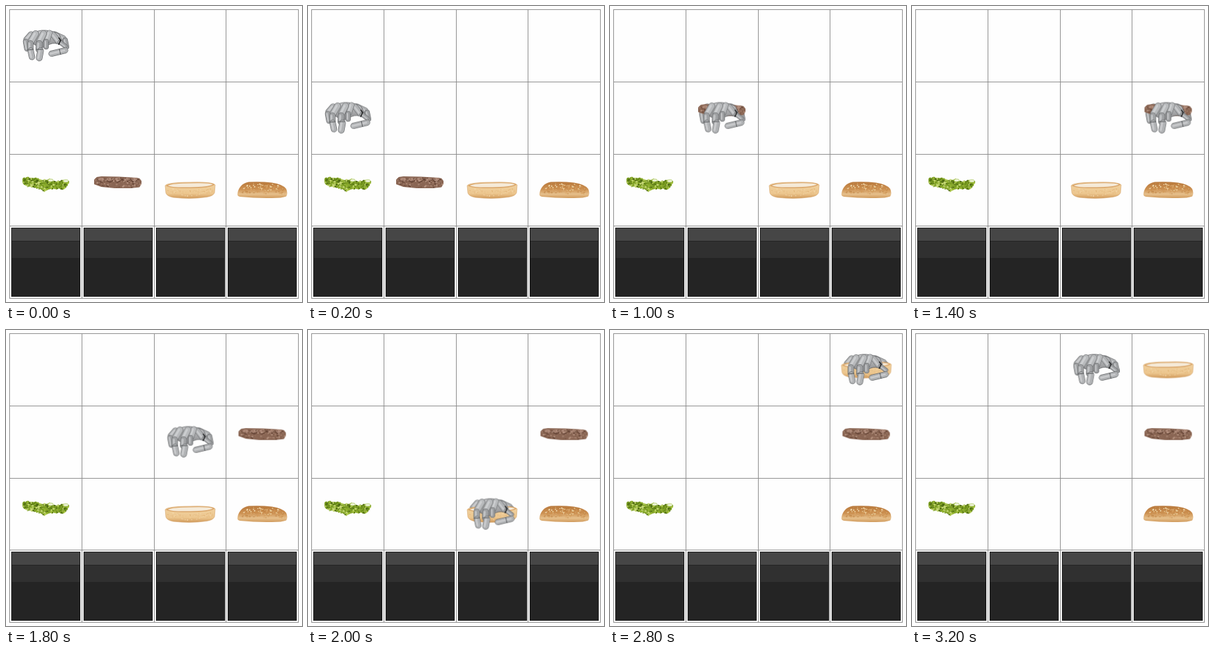
Recreate the animation shown at these times as an HTML page. Size 450x450 px, loop 3.4 s.

```html
<!DOCTYPE html>
<html lang="en">
<head>
<meta charset="utf-8">
<title>Robot hand stacking a burger</title>
<style>
  html, body { margin: 0; width: 100%; height: 100%; overflow: hidden; background: #fefefe; }
  svg { display: block; width: 100vw; height: 100vh; --c: 109.75px; }
  .hand, #patty, #base { animation: 3400ms step-end infinite; }
  .hand { animation-name: hand; }
  #patty { animation-name: patty; }
  #base { animation-name: base; }

  /* Everything jumps in whole cells. */
  @keyframes hand {
    0% { transform: translate(0, 0); }
    5.882% { transform: translate(0, var(--c)); }
    11.764% { transform: translate(0, calc(2 * var(--c))); }
    17.647% { transform: translate(var(--c), calc(2 * var(--c))); }
    29.411% { transform: translate(var(--c), var(--c)); }
    35.294% { transform: translate(calc(2 * var(--c)), var(--c)); }
    41.176% { transform: translate(calc(3 * var(--c)), var(--c)); }
    52.941% { transform: translate(calc(2 * var(--c)), var(--c)); }
    58.823% { transform: translate(calc(2 * var(--c)), calc(2 * var(--c))); }
    70.588% { transform: translate(calc(2 * var(--c)), var(--c)); }
    76.470% { transform: translate(calc(2 * var(--c)), 0); }
    82.352% { transform: translate(calc(3 * var(--c)), 0); }
    94.117%, 100% { transform: translate(calc(2 * var(--c)), 0); }
  }
  @keyframes patty {
    0% { transform: translate(0, 0); }
    29.411% { transform: translate(0, calc(-1 * var(--c))); }
    35.294% { transform: translate(var(--c), calc(-1 * var(--c))); }
    41.176%, 100% { transform: translate(calc(2 * var(--c)), calc(-1 * var(--c))); }
  }
  @keyframes base {
    0% { transform: translate(0, 0); }
    70.588% { transform: translate(0, calc(-1 * var(--c))); }
    76.470% { transform: translate(0, calc(-2 * var(--c))); }
    82.352%, 100% { transform: translate(var(--c), calc(-2 * var(--c))); }
  }
</style>
</head>
<body>
<svg viewBox="0 0 450 450">
  <defs>
    <linearGradient id="crust" x1="0" y1="0" x2="0" y2="1">
      <stop offset="0" stop-color="#b97a3e"/>
      <stop offset=".45" stop-color="#cb8f50"/>
      <stop offset=".75" stop-color="#e6c08c"/>
      <stop offset="1" stop-color="#d09a5c"/>
    </linearGradient>
    <linearGradient id="side" x1="0" y1="0" x2="0" y2="1">
      <stop offset="0" stop-color="#f0d2a2"/>
      <stop offset=".7" stop-color="#edc78f"/>
      <stop offset="1" stop-color="#d09a5b"/>
    </linearGradient>
    <linearGradient id="steel" x1="0" y1="0" x2="0" y2="1">
      <stop offset="0" stop-color="#cbccce"/>
      <stop offset="1" stop-color="#88898b"/>
    </linearGradient>
  </defs>

  <rect width="450" height="450" fill="#fefefe"/>
  <g id="grid" fill="#8c8c8c"></g>
  <g id="tiles"></g>

  <g id="handBack" class="hand"></g>

  <g id="lettuce"></g>
  <g id="patty"></g>
  <g id="base">
    <path d="M242 273 Q246 268 280 268 Q314 267 318 272 L317 284 Q315 289 305 290.500 Q280 294 254 291 Q244 289 243 284 Z" fill="url(#side)" stroke="#d3a268" stroke-width=".6"/>
    <path d="M243 273 Q250 268.500 280 268.500 Q312 267.500 317 271.500 Q312 276.500 280 277 Q248 277.500 243 273 Z" fill="#d9a467"/>
    <path d="M246 273 Q254 269.500 280 269.500 Q310 268.500 314.500 271.500 Q308 275 280 275.500 Q250 276 246 273 Z" fill="#f5ead8"/>
  </g>
  <g id="top">
    <path d="M352 285 C353 278 358 269 369 267.500 Q388 266.500 404 268.500 Q421 271 426 278 Q429 285 426 289.500 Q420 292 404 292 Q380 292.500 356 290 Q351 289 352 285 Z" fill="url(#crust)"/>
  </g>

  <g id="handFront" class="hand"></g>
</svg>
<script>
  const CELL = 109.75;
  const $ = id => document.getElementById(id);

  function add(parent, tag, attrs) {
    const el = document.createElementNS('http://www.w3.org/2000/svg', tag);
    for (const key in attrs) el.setAttribute(key, attrs[key]);
    parent.appendChild(el);
    return el;
  }

  function seeded(seed) {
    return () => (seed = (seed * 16807) % 2147483647) / 2147483647;
  }

  // Height of a polyline at x
  function yAt(line, x) {
    let i = 1;
    while (i < line.length - 1 && line[i][0] < x) i++;
    const [[x0, y0], [x1, y1]] = [line[i - 1], line[i]];
    return y0 + (y1 - y0) * (x - x0) / (x1 - x0);
  }

  // Scatters specks between an upper and a lower edge
  function speckle(g, top, bottom, count, size, colors, seed, opacity = 1) {
    const rnd = seeded(seed);
    const left = top[0][0], right = top[top.length - 1][0];
    for (let i = 0; i < count; i++) {
      const r = size * (.5 + rnd());
      const x = left + r + rnd() * (right - left - 2 * r);
      const a = yAt(top, x) + r, b = yAt(bottom, x) - r;
      const fill = colors[Math.floor(rnd() * colors.length)];
      add(g, 'ellipse', {
        cx: x.toFixed(1), cy: (a + rnd() * (b - a)).toFixed(1),
        rx: r, ry: r * (.6 + .4 * rnd()), fill, opacity
      });
    }
  }

  function body(g, top, bottom, fill) {
    add(g, 'polygon', { points: [...top, ...bottom.slice().reverse()].join(' '), fill });
  }

  // One rounded metal link
  function link(g, x1, y1, x2, y2, w, tone = '#b0b2b4') {
    const line = (stroke, width, dx, opacity = 1) => add(g, 'line', {
      x1: x1 + dx, y1, x2: x2 + dx, y2, stroke, opacity,
      'stroke-width': width, 'stroke-linecap': 'round'
    });
    line('#626466', w, 0);
    line(tone, w - 1.2, 0);
    line('#dcdddf', w * .3, -w * .14, .6);
  }

  // Grid lines, 1px each
  for (let i = 0; i < 5; i++) {
    const p = Math.round(5 + i * CELL);
    add($('grid'), 'rect', { x: p, y: 5, width: 1, height: 440 });
    add($('grid'), 'rect', { x: 5, y: p, width: 440, height: 1 });
  }

  for (let i = 0; i < 4; i++) {
    const x = Math.round(8 + i * CELL), g = $('tiles');
    const band = (y, h, fill) => add(g, 'rect', { x, y, width: 105, height: h, fill });
    band(337, 105, '#242424');
    band(337, 20, '#464646');
    band(357, 26, '#303030');
    band(357, 1, '#222');
    add(g, 'rect', { x: x + .5, y: 337.5, width: 104, height: 104, fill: 'none', stroke: '#1c1c1c' });
  }

  // Lettuce
  {
    const g = $('lettuce');
    const top = [[25, 261], [33, 259], [48, 260], [56, 263], [66, 262], [76, 265], [88, 263], [96, 264]];
    const bottom = [[25, 271], [33, 276], [44, 277], [58, 283], [72, 279], [88, 280], [96, 271]];
    const inner = bottom.map(([x, y]) => [x, y - 2]);
    body(g, top.map(([x, y]) => [x, y + 2]), inner, '#86a62c');
    speckle(g, top, bottom, 330, 1.3, ['#4e6a12', '#6c8f1b', '#8fb02c', '#a9c545', '#c6d877', '#7a9c22'], 41);
    for (const [cx, cy] of [[68, 265], [91, 266]])
      add(g, 'ellipse', { cx, cy, rx: 4, ry: 2, fill: '#eef3d8', stroke: '#a9c860', 'stroke-width': .7 });
  }

  // Patty: grill marks leave a row of lighter lumps
  {
    const g = $('patty');
    const top = [[134, 264], [138, 260], [145, 259], [172, 259.5], [198, 261], [203, 262], [206, 266]];
    const bottom = [[134, 271], [145, 275], [165, 277], [190, 277], [203, 275.5], [206, 270]];
    body(g, top, bottom, '#8a6654');
    for (let i = 0; i < 5; i++) {
      const cx = 145 + i * 12.5;
      add(g, 'ellipse', { cx, cy: 264, rx: 4.5, ry: 3, fill: '#b08c7b' });
      add(g, 'path', {
        d: `M${cx - 6} 263q6 9 12 0`,
        fill: 'none', stroke: '#593a2c', 'stroke-width': 2, opacity: .8
      });
    }
    speckle(g, top, bottom, 190, 1, ['#5d3f31', '#7a5645', '#94705e', '#ab8673', '#c2a18f'], 17, .8);
  }

  // Toasted crumb on the lower bun, seeds on the upper one
  speckle($('base'), [[245, 277], [280, 279], [315, 276]], [[245, 285], [280, 291], [315, 285]],
    90, .8, ['#dfb072', '#f6dfb8', '#e6bd82'], 7, .6);
  speckle($('top'), [[355, 280], [366, 270], [390, 268], [416, 272], [425, 279]], [[355, 286], [425, 287]],
    110, 1.2, ['#b9793a', '#dba668', '#d0954f'], 23, .45);
  speckle($('top'), [[358, 277], [368, 269], [390, 268], [414, 271], [423, 277]], [[358, 281], [390, 282], [423, 281]],
    40, .9, ['#f4dfb4', '#ead09c'], 9);

  // The far finger and the wrist lie behind whatever is held.
  {
    const g = $('handBack');
    link(g, 38, 43, 31, 51, 9);
    link(g, 30, 54, 32, 65, 8.5, '#9fa1a3');
    link(g, 74, 43, 87, 49, 9);
    link(g, 90, 52, 92, 62, 8, '#9fa1a3');
  }
  {
    const g = $('handFront');
    add(g, 'path', {
      d: 'M40 43Q48 36 60 37Q74 38 81 43L85 52L83 59Q74 55 67 58L54 64L42 58Z',
      fill: 'url(#steel)', stroke: '#5c5e60', 'stroke-width': .8
    });
    link(g, 72, 44, 79, 53, 9);
    link(g, 66, 41, 62, 53, 9, '#b8babc');
    link(g, 61, 54, 61, 62, 8, '#9c9ea0');
    link(g, 45, 42, 38, 54, 10, '#b8babc');
    link(g, 37, 57, 37, 66, 9.5, '#9fa1a3');
    link(g, 37.5, 68, 39.5, 77.5, 9.5);
    link(g, 57, 42, 51, 54, 10, '#b8babc');
    link(g, 50.5, 57, 50, 66, 10, '#9fa1a3');
    link(g, 52.5, 68, 50.5, 79, 10);
    link(g, 82, 55, 90, 61, 7, '#9fa1a3');
    link(g, 69, 72.5, 90, 67.5, 9);
    add(g, 'path', { d: 'M80 48L83 52L80 59', fill: 'none', stroke: '#1d1e1f', 'stroke-width': 1.6 });
    add(g, 'path', { d: 'M33 67l9 -1M46 66l10 0M81 65l2 9', fill: 'none', stroke: '#47494b', 'stroke-width': .9 });
  }
</script>
</body>
</html>
```
